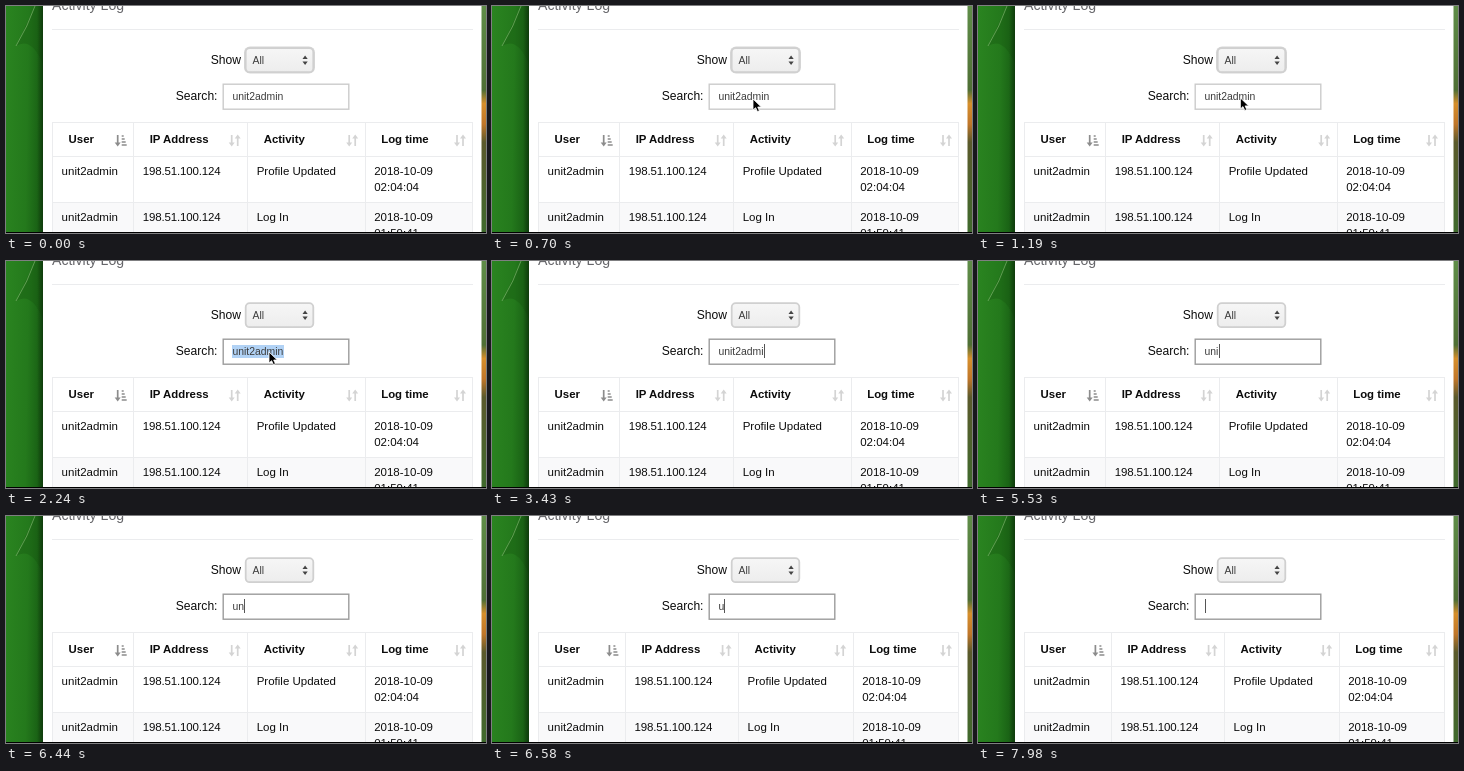
Recreate the animation shown at these times as an HTML page. Size 480x227 px, loop 8 s.

```html
<!DOCTYPE html>
<html lang="en">
<head>
<meta charset="utf-8">
<title>Activity log search</title>
<style>
  html, body { margin: 0; width: 100%; height: 100%; overflow: hidden; background: #fff; }
  svg { display: block; width: 480px; height: 227px; }
  text { font: 11.5px "Liberation Sans", Arial, sans-serif; fill: #0c0c0c; white-space: pre; }
  .title { font-size: 14.1px; fill: #66666a; }
  .label { font-size: 12.1px; }
  .head { font-size: 11.4px; font-weight: bold; }
  .ip { letter-spacing: -.15px; }
  .field { font-size: 10.4px; fill: #3c3c3c; }
  .line { fill: none; stroke: #ebecee; }
</style>
</head>
<body>
<svg viewBox="0 0 480 227">
  <defs>
    <linearGradient id="leaf" x2="1" y2=".1">
      <stop offset="0" stop-color="#2a8420"/>
      <stop offset=".6" stop-color="#24791c"/>
      <stop offset="1" stop-color="#175c13"/>
    </linearGradient>
    <linearGradient id="edge" x2="0" y2="1">
      <stop offset="0" stop-color="#5f8d48"/>
      <stop offset=".37" stop-color="#4f6f35"/>
      <stop offset=".43" stop-color="#d68f2c"/>
      <stop offset=".52" stop-color="#c0762a"/>
      <stop offset=".6" stop-color="#5b5a2c"/>
      <stop offset="1" stop-color="#3f6a2d"/>
    </linearGradient>
    <linearGradient id="button" x2="0" y2="1">
      <stop offset="0" stop-color="#f6f6f6"/>
      <stop offset="1" stop-color="#ededed"/>
    </linearGradient>
    <linearGradient id="shade">
      <stop offset="0" stop-opacity="0"/>
      <stop offset="1" stop-opacity=".35"/>
    </linearGradient>
    <g id="sort">
      <path d="M-3-5.5V3M3 5.5V-3"/>
      <path d="M-6 2h6l-3 4zM0-2h6l-3-4z" fill="#d4d4d4" stroke="none"/>
    </g>
    <g id="sorted">
      <path d="M-3-5.5V3M1-4.5h2M1-1.5h3M1 1.5h4M1 4.5h5"/>
      <path d="M-6 2h6l-3 4z" fill="#8c8c8c" stroke="none"/>
    </g>
  </defs>

  <rect width="38" height="227" fill="url(#leaf)"/>
  <path d="M29 0H38V60Q26 30 10 40Z" fill="#14540f" opacity=".35"/>
  <path d="M29 0Q22 20 10 40" fill="none" stroke="#8cc07a" opacity=".6"/>
  <rect x="31" width="6" height="227" fill="url(#shade)"/>
  <rect x="475" width="5" height="227" fill="url(#edge)"/>
  <rect x="37" width="438.5" height="227" fill="#fff"/>

  <text class="title" x="46" y="4">Activity Log</text>
  <path class="line" d="M46 23.5H467"/>

  <text class="label" x="204.8" y="58">Show</text>
  <rect id="glow" x="238" y="40.5" width="71" height="27" rx="6" fill="#d6d6d6"/>
  <rect x="239.7" y="42.2" width="67.6" height="24" rx="4" fill="url(#button)" stroke="#d0d0d0" stroke-width="1.8"/>
  <text class="field" x="246.5" y="57.5">All</text>
  <path d="M296.5 53l2.6-3.6 2.6 3.6zM296.5 55.5l2.6 3.6 2.6-3.6z" fill="#444"/>

  <text class="label" x="169.8" y="94">Search:</text>
  <rect id="box" x="217.2" y="78.2" width="125.6" height="25" fill="#fff" stroke-width="1.4"/>
  <rect id="mark" x="226" y="84" width="52" height="13" fill="#b1d2f5"/>
  <text id="query" class="field" x="226.5" y="94"></text>
  <rect id="caret" y="83" width="1" height="14" fill="#555"/>

  <g id="table"></g>

  <path id="mouse" d="M0 0V11L2.6 8.7 4.4 12.6 6.4 11.7 4.7 8H8.3Z" fill="#000" stroke="#fff" stroke-width=".8"/>
  <rect y="226" width="480" height="1" fill="#000"/>
</svg>

<script>
const LOOP = 8000;
const USER = "unit2admin", IP = "198.51.100.124";
const WIDE = [46.6, 127.7, 241.7, 359.2], SHIFTED = [46.6, 133.4, 246.6, 361.2];
const RIGHT = 467;
const FOCUS = 1260, SELECT = 1400, DESELECT = 2660, HIDE = 2800, RESIZE = 6580;
// Times at which the last remaining letter is deleted
const DELETES = [3430, 3710, 4130, 4340, 4620, 5040, 5530, 5880, 6580, 7280];
// time, x, y of the pointer tip
const PATH = [[70, 300, 228], [700, 261, 93], [840, 262, 92.5], [1050, 262, 92.5], [1680, 263, 91]];

const $ = id => document.getElementById(id);
const text = (x, y, s, cls = "") => `<text class="${cls}" x="${x}" y="${y}">${s}</text>`;

function row(cols, y, activity, time) {
  const at = i => cols[i] + 9;
  return text(at(0), y, USER) + text(at(1), y, IP, "ip") + text(at(2), y, activity) +
    text(at(3), y, "2018-10-09") + text(at(3), y + 16, time);
}

function table(cols) {
  const ends = [...cols.slice(1), RIGHT];
  let out = `<rect x="46" y="196" width="421" height="31" fill="#f9f9fa"/>`;
  out += `<path class="line" d="M46 116.5H467M46 150.5H467M46 196.5H467M466.5 116V227` +
    cols.map(x => `M${Math.floor(x) + .5} 116V227`).join("") + `"/>`;
  ["User", "IP Address", "Activity", "Log time"].forEach((s, i) => {
    out += text(cols[i] + 16, 137, s, "head");
    const icon = i ? `<use href="#sort" stroke="#d4d4d4"/>` : `<use href="#sorted" stroke="#8c8c8c"/>`;
    out += `<g transform="translate(${ends[i] - 13} 134.5)" fill="none" stroke-width="1.7">${icon}</g>`;
  });
  return out + row(cols, 169, "Profile Updated", "02:04:04") + row(cols, 215, "Log In", "01:59:41");
}

function pointer(t) {
  const i = PATH.findIndex(p => p[0] > t);
  if (i < 0) return PATH[PATH.length - 1].slice(1);
  if (i === 0) return PATH[0].slice(1);
  const a = PATH[i - 1], b = PATH[i];
  const k = 1 - (1 - (t - a[0]) / (b[0] - a[0])) ** 2;
  return [a[1] + (b[1] - a[1]) * k, a[2] + (b[2] - a[2]) * k];
}

const show = (id, on) => $(id).setAttribute("visibility", on ? "visible" : "hidden");
let lastCols, lastQuery;

function draw(t) {
  const cols = t < RESIZE ? WIDE : SHIFTED;
  if (cols !== lastCols) $("table").innerHTML = table(lastCols = cols);

  const query = USER.slice(0, USER.length - DELETES.filter(d => d <= t).length);
  if (query !== lastQuery) {
    $("query").textContent = lastQuery = query;
    const width = query ? $("query").getComputedTextLength() : 0;
    $("caret").setAttribute("x", Math.round(226.7 + width));
  }

  $("box").setAttribute("stroke", t < FOCUS ? "#cbcbcb" : "#9c9c9c");
  show("glow", t < FOCUS);
  show("mark", t >= SELECT && t < DESELECT);
  show("caret", t >= DESELECT);
  show("mouse", t >= 70 && t < HIDE);
  $("mouse").setAttribute("transform", `translate(${pointer(t)})`);
}

const start = performance.now();
function tick() {
  draw((performance.now() - start) % LOOP);
  requestAnimationFrame(tick);
}
tick();
</script>
</body>
</html>
```
